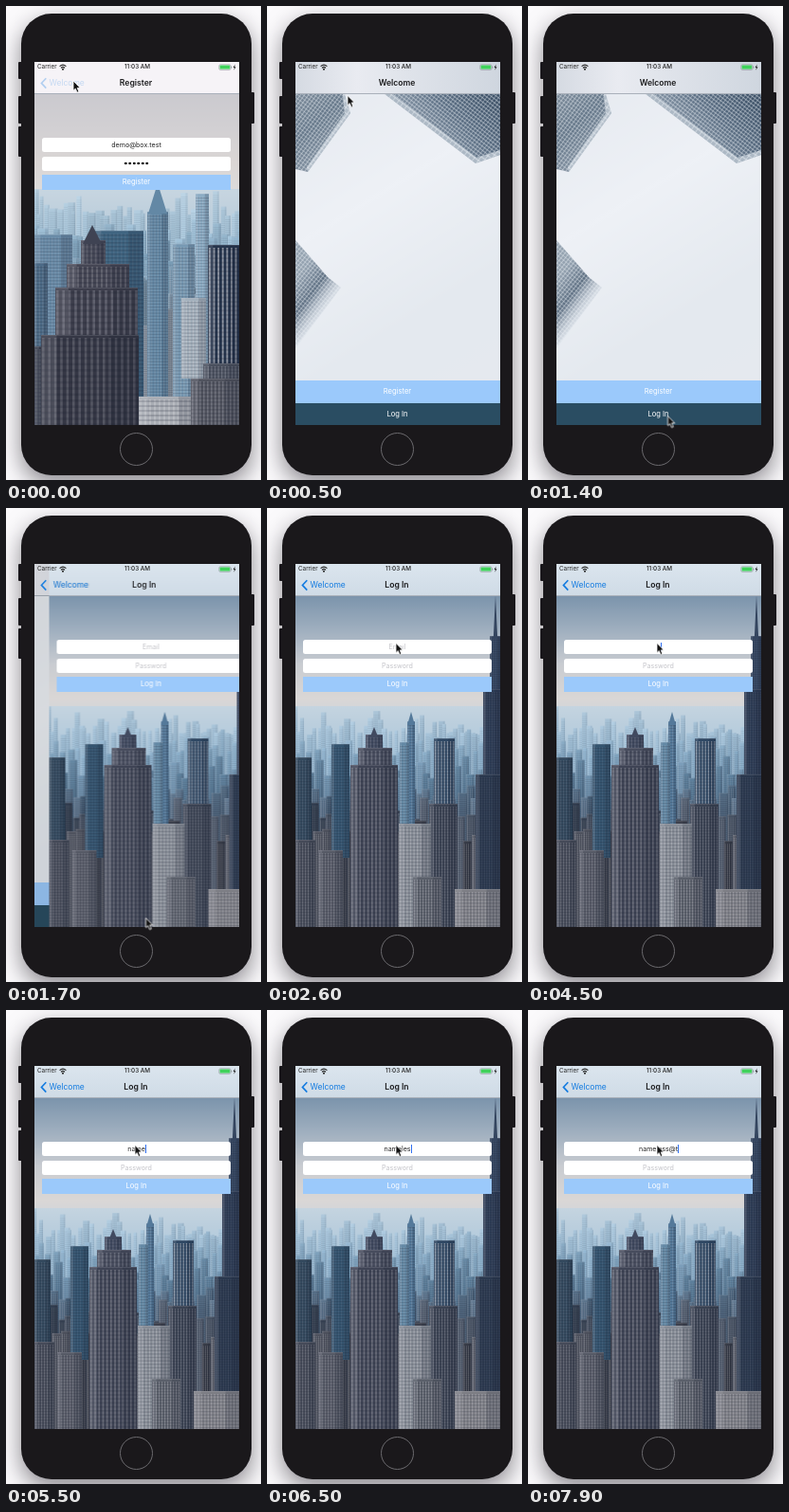
Recreate the animation shown at these times as an HTML page with a canvas. Size 269 by 500 pixels, loop 8000 ms.

```html
<!DOCTYPE html>
<html lang="en">
<head>
<meta charset="utf-8">
<title>Sign-in flow</title>
<style>
  html, body { margin: 0; width: 100%; height: 100%; overflow: hidden; background: #fbfafc; }
  * { box-sizing: border-box; }
  .stage { position: relative; width: 269px; height: 500px; overflow: hidden; font-family: Inter, "Open Sans", sans-serif; }
  .stage div, .stage canvas, .stage svg { position: absolute; }
  .body { left: 16px; top: 7.5px; width: 243px; height: 487px; border-radius: 32px; background: #1a181b;
    box-shadow: 0 9px 23px rgba(25, 21, 32, .5); }
  .key { width: 5px; background: #1a181b; border-radius: 1px; }
  .home { left: 120px; top: 450px; width: 35px; height: 35px; border: 1.5px solid #6b6a6e; border-radius: 50%; }
  .screen { left: 29.5px; top: 59px; width: 216px; height: 383px; overflow: hidden; background: #ccd4de; }
  .page { inset: 0; }
  .page canvas { left: 0; top: 0; width: 216px; height: 383px; }
  .bar { left: 0; top: 0; width: 216px; height: 33.5px; border-bottom: .5px solid #a9b0ba; }
  .dim { inset: 0; background: #000; opacity: 0; }
  .row { left: 8.5px; width: 199px; height: 15px; line-height: 15.5px; text-align: center; font-size: 7.1px; color: #222; }
  .field { background: #fff; border-radius: 2.5px; }
  .email { top: 80px; }
  .pass { top: 99.5px; }
  .go { top: 119px; height: 15.5px; line-height: 16.5px; background: #9bc9fb; color: #fff; font-size: 7.6px; }
  .hint { inset: 0; color: #c3c3c8; }
  .dots { left: 86px; top: 5.4px; width: 27px; height: 4.5px;
    background: radial-gradient(circle, #111 1.3px, transparent 1.8px) 0 0 / 4.5px 4.5px; }
  .wide { left: 0; width: 216px; height: 24px; line-height: 24px; text-align: center; color: #fff; font-size: 7.6px; }
  .status { top: 1px; height: 9px; line-height: 9px; font-size: 6.3px; color: #222; }
  .title { left: 0; width: 215px; top: 15px; height: 14px; line-height: 14px; text-align: center;
    font-size: 8.6px; font-weight: 600; color: #1c1c1e; }
  .label { left: 16px; top: 15px; line-height: 14px; font-size: 8.5px; color: #137be0; }
  .caret { display: inline-block; width: 1px; height: 9px; margin-right: -1px; vertical-align: -1.5px; background: #2f6ff0; }

  .page, .dim, .title, .label, .chev { animation: 8s cubic-bezier(.2, .8, .2, 1) infinite; }
  .welcome { animation-name: under; }
  .welcome .dim { animation-name: dim; }
  .register { animation-name: pop; }
  .login { animation-name: push; }
  .t-register { animation-name: titleOut; }
  .t-welcome { animation-name: titleMid; }
  .t-login { animation-name: titleIn; }
  .label { animation-name: label; }
  .chev { animation-name: chev; }
  .hint.first { animation: hint 8s step-end infinite; }
  .caret { animation: caret 8s step-end infinite; }
  .pointer { left: 0; top: 0; animation: pointer 8s ease-in-out infinite; }

  /* back at 20–480 ms, forward at 1475–1975 ms */
  @keyframes pop { 0%, .25% { transform: none } 6%, 100% { transform: translateX(216px) } }
  @keyframes push { 0%, 18.44% { transform: translateX(216px) } 24.69%, 100% { transform: none } }
  @keyframes under {
    0%, .25% { transform: translateX(-65px) } 6%, 18.44% { transform: none } 24.69%, 100% { transform: translateX(-65px) }
  }
  @keyframes dim { 0%, .25% { opacity: .1 } 6%, 18.44% { opacity: 0 } 24.69%, 100% { opacity: .1 } }
  @keyframes titleOut {
    0%, .25% { transform: none; opacity: 1 } 6%, 100% { transform: translateX(122px); opacity: 0 }
  }
  @keyframes titleIn {
    0%, 18.44% { transform: translateX(122px); opacity: 0 } 24.69%, 100% { transform: none; opacity: 1 }
  }
  @keyframes titleMid {
    0%, .25% { transform: translateX(-73px); opacity: 0 }
    6%, 18.44% { transform: none; opacity: 1 }
    24.69%, 100% { transform: translateX(-73px); opacity: 0 }
  }
  @keyframes label {
    0%, .25% { transform: none; opacity: .22 }
    6%, 18.44% { transform: translateX(60px); opacity: 0 }
    24.69%, 100% { transform: none; opacity: 1 }
  }
  @keyframes chev { 0%, .25% { opacity: .3 } 6%, 18.44% { opacity: 0 } 24.69%, 100% { opacity: 1 } }
  @keyframes hint { 0% { opacity: 1 } 55%, 100% { opacity: 0 } }
  @keyframes caret { 0% { opacity: 0 } 37.5%, 100% { opacity: 1 } }
  @keyframes pointer {
    0%, 1.5% { transform: translate(71px, 79px) }
    6.25%, 8% { transform: translate(85px, 94.5px) }
    16.25%, 21.5% { transform: translate(147.5px, 432.5px) }
    31.9%, 100% { transform: translate(136px, 142.5px) }
  }
</style>
</head>
<body>
<div class="stage">
  <div class="key" style="left:13px;top:59px;height:18px"></div>
  <div class="key" style="left:13px;top:95px;height:29px"></div>
  <div class="key" style="left:13px;top:127px;height:32px"></div>
  <div class="key" style="left:257px;top:91px;height:33px"></div>
  <div class="body"></div>
  <div class="home"></div>

  <div class="screen">
    <div class="page welcome">
      <canvas id="sky"></canvas>
      <div class="bar" style="background:linear-gradient(90deg,#d5dae2,#e9ebf1 30%,#dfe3ea 55%,#cfd6df)"></div>
      <div class="wide" style="top:336px;background:#9bc9fb">Register</div>
      <div class="wide" style="top:359.5px;background:#2a4d62">Log In</div>
      <div class="dim"></div>
    </div>

    <div class="page register">
      <canvas id="near"></canvas>
      <div class="bar" style="background:#f6f3f7"></div>
      <div class="row field email">demo@box.test</div>
      <div class="row field pass"><div class="dots"></div></div>
      <div class="row go">Register</div>
    </div>

    <div class="page login">
      <canvas id="far"></canvas>
      <div class="bar" style="background:linear-gradient(#dbe5ee,#cfdbe6)"></div>
      <div class="row field email"><div class="hint first">Email</div><span id="typed"></span><span class="caret"></span></div>
      <div class="row field pass"><div class="hint">Password</div></div>
      <div class="row go">Log In</div>
    </div>

    <div class="status" style="left:3.5px">Carrier</div>
    <div class="status" style="left:0;width:218px;text-align:center;font-weight:500">11:03 AM</div>
    <svg style="left:26px;top:2px" width="8" height="7" fill="none" stroke="#222" stroke-width="1.1">
      <path d="M.6 2.7Q4-.6 7.4 2.7M2 4.3Q4 2.5 6 4.3"/><circle cx="4" cy="5.7" r=".5"/>
    </svg>
    <svg style="left:194.5px;top:2px" width="20" height="8">
      <rect x=".8" y=".8" width="12.2" height="5.6" rx="1.4" fill="none" stroke="#8b9298" stroke-width=".6"/>
      <rect x="1.6" y="1.6" width="10.6" height="4" rx=".7" fill="#3fd25a"/>
      <path d="M13.7 2.7v1.8" stroke="#8b9298"/>
      <path d="M17.6.6L15.6 4h1.3l-.5 2.8L18.5 3.2h-1.3z" fill="#222"/>
    </svg>

    <svg class="chev" style="left:6.5px;top:16px" width="8" height="13" fill="none" stroke="#137be0" stroke-width="1.6">
      <path d="M6.3 1.2L1.4 6.4l4.9 5.2"/>
    </svg>
    <div class="label">Welcome</div>
    <div class="title t-register">Register</div>
    <div class="title t-welcome">Welcome</div>
    <div class="title t-login">Log In</div>
  </div>

  <svg class="pointer" width="10" height="14" overflow="visible">
    <path d="M0 0v10.2l2.3-2 1.7 4 1.9-.8-1.7-3.9h3.1z" fill="#111" stroke="#fff" stroke-width=".8"/>
  </svg>
</div>

<script>
const W = 216, H = 383;

function surface(id) {
  const el = document.getElementById(id);
  el.width = W * 2;
  el.height = H * 2;
  const c = el.getContext('2d');
  c.scale(2, 2);
  return c;
}

function random(seed) {
  return () => (seed = (seed * 16807) % 2147483647) / 2147483647;
}

function fade(c, x0, y0, x1, y1, colors) {
  const g = c.createLinearGradient(x0, y0, x1, y1);
  colors.forEach((col, i) => g.addColorStop(i / (colors.length - 1), col));
  return g;
}

// One block with lit columns, faint floors, a bright left edge and a shaded side
function tower(c, x, y, w, color, glow, gap = 3, bottom = H) {
  const h = bottom - y;
  c.fillStyle = color;
  c.fillRect(x, y, w, h);
  c.fillStyle = `rgba(214,214,220,${glow})`;
  for (let i = x + 1; i < x + w - 1; i += gap) c.fillRect(i, y + 3, gap * .4, h - 3);
  c.fillStyle = 'rgba(20,28,42,.17)';
  for (let j = y + 4; j < bottom; j += gap) c.fillRect(x, j, w, gap * .4);
  c.fillRect(x + w * .7, y, w * .3, h);
  c.fillStyle = 'rgba(225,225,228,.13)';
  c.fillRect(x, y, w * .16, h);
  c.fillRect(x, y, w, 1);
}

// Rows of random buildings, darker towards the viewer
function crowd(c, seed, rows, top, size) {
  const rnd = random(seed);
  rows.forEach((rgb, r) => {
    const s = size * (.75 + r * .14);
    for (let x = -4; x < W; x += s * (.4 + rnd() * .9)) {
      const y = top + r * 23 + rnd() ** .6 * 30;
      const k = (rnd() - .5) * 42;
      const color = `rgb(${rgb.map(v => Math.round(v + k))})`;
      tower(c, x, y, s * (.5 + rnd() * .8), color, .06 + r * .04, 2.2);
    }
  });
}

function city(id, sky, seed, rows, top, size, blocks) {
  const c = surface(id);
  c.fillStyle = fade(c, 0, 33, 0, 250, sky);
  c.fillRect(0, 0, W, H);
  crowd(c, seed, rows, top, size);
  c.fillStyle = fade(c, 0, top, 0, top + 110, ['rgba(190,212,228,.7)', 'rgba(150,185,210,.35)', 'rgba(150,185,210,0)']);
  c.fillRect(0, top, W, 110);
  blocks.forEach(b => tower(c, ...b));
  return c;
}

function spire(c, x, y, h, half, color) {
  c.fillStyle = color;
  c.beginPath();
  c.moveTo(x, y);
  c.lineTo(x + half, y + h);
  c.lineTo(x - half, y + h);
  c.fill();
}

const far = city('far', ['#7b94ac', '#9fafbf', '#c9ccd1', '#dad7d6', '#c6d4e0', '#9bbad1', '#6c90ad'], 71,
  [[158, 188, 211], [126, 162, 190], [94, 128, 157], [74, 97, 121], [64, 75, 92], [62, 66, 78]], 150, 8, [
    [205, 76, 11, '#34455f', .08, 2.4],
    [198, 132, 18, '#2c3b54', .1, 2.6],
    [190, 222, 26, '#2a384e', .1, 2.6],
    [118, 166, 8, '#54799a', .14],
    [110, 188, 10, '#6489a5', .14],
    [146, 184, 22, '#2f4864', .5, 3.2, 254],
    [38, 190, 19, '#34546f', .08, 3, 310],
    [0, 204, 17, '#33495e', .12, 3],
    [141, 253, 30, '#3a4252', .24],
    [0, 291, 21, '#454a58', .22],
    [24, 302, 26, '#565a66', .2],
    [109, 274, 34, '#858b95', .35, 3.6],
    [124, 330, 30, '#5a5f6a', .3],
    [74, 180, 18, '#414a60', .16, 3.6],
    [66, 194, 36, '#474c5d', .24, 4.2],
    [58, 212, 50, '#3f4455', .28, 4.2],
    [168, 343, 48, '#7c7d84', .3, 3.4]
  ]);
spire(far, 211, 33, 46, 2.2, '#34455f');
spire(far, 122, 156, 14, 4, '#54799a');
spire(far, 83, 172, 10, 4, '#414a60');

const near = city('near', ['#cbcacf', '#d2d0d3', '#dad6d5', '#dedcdc', '#ccd8e2', '#adc7da', '#8aacc5'], 193,
  [[176, 202, 219], [150, 183, 205], [128, 163, 188], [118, 148, 171], [122, 146, 165], [112, 124, 138]], 134, 10, [
    [170, 139, 14, '#8cacc4', .16],
    [0, 182, 40, '#6a8ca8', .12, 3.4],
    [62, 178, 53, '#3f6480', .07, 4],
    [119, 158, 22, '#6388a5', .18, 3.2],
    [146, 192, 23, '#7799b3', .2, 3.4],
    [0, 212, 14, '#4c6a86', .14, 3.6],
    [155, 249, 26, '#a3b0bc', .4, 3.6, 334],
    [183, 193, 33, '#25344c', .6, 4.6, 320],
    [178, 318, 38, '#4a505e', .24, 3.6],
    [110, 353, 60, '#a9adb4', .35, 5],
    [165, 334, 51, '#50535e', .24, 4],
    [0, 300, 30, '#343a4a', .16, 4],
    [49, 188, 26, '#454756', .16, 4.6],
    [34, 213, 66, '#454654', .2, 5],
    [22, 238, 87, '#3d3e4c', .24, 6.4],
    [7, 288, 103, '#353745', .2, 6.4]
  ]);
spire(near, 130, 128, 32, 10, '#6388a5');
spire(near, 61, 172, 20, 10, '#3f4353');

// Glass wall: filled outline with two sets of parallel lines
function wall(c, points, fill, angle, gap) {
  c.save();
  c.beginPath();
  points.forEach(p => c.lineTo(...p));
  c.closePath();
  c.fillStyle = fill;
  c.fill();
  c.clip();
  c.translate(...points[0]);
  c.rotate(angle);
  c.fillStyle = 'rgba(236,241,246,.42)';
  for (let i = -240; i < 240; i += gap) {
    c.fillRect(-240, i, 480, gap * .32);
    c.fillRect(i, -240, gap * .22, 480);
  }
  c.restore();
}

const sky = surface('sky');
sky.fillStyle = fade(sky, 0, 33, W, H, ['#e6eaf0', '#eef1f6', '#e4e9ef', '#e6eaef']);
sky.fillRect(0, 0, W, H);
wall(sky, [[0, 10], [42, 10], [58, 54], [13, 116], [0, 113]],
  fade(sky, 0, 33, 50, 90, ['#7d8c9b', '#66788a', '#8795a4']), -.94, 3.4);
wall(sky, [[48, 20], [58, 54], [13, 116], [12, 111], [52, 54]], '#b4bfca', -.94, 5);
wall(sky, [[76, 20], [W, 20], [W, 98], [190, 107], [93, 33]],
  fade(sky, 130, 75, 190, 20, ['#8a99a9', '#5c6f84', '#3f5369']), .65, 3.4);
wall(sky, [[190, 107], [93, 33], [100, 33], [191, 101], [W, 93], [W, 98]], '#adb9c5', .65, 5);
wall(sky, [[0, 188], [34, 227], [48, 238], [0, 302]],
  fade(sky, 4, 225, 40, 252, ['#94a2b0', '#5f7083', 'rgba(190,200,212,.25)']), -.9, 3.4);

// Typed address: each letter appears at its own time
const times = [4400, 4750, 5100, 5450, 5800, 6150, 6450, 7000, 7400, 7800];
[...'nameless@t'].forEach((letter, i) => {
  const span = document.createElement('span');
  span.textContent = letter;
  document.getElementById('typed').append(span);
  span.animate([
    { fontSize: '0px', offset: 0, easing: 'step-end' },
    { fontSize: '7.1px', offset: times[i] / 8000, easing: 'step-end' },
    { fontSize: '7.1px', offset: 1 }
  ], { duration: 8000, iterations: Infinity });
});
</script>
</body>
</html>
```
